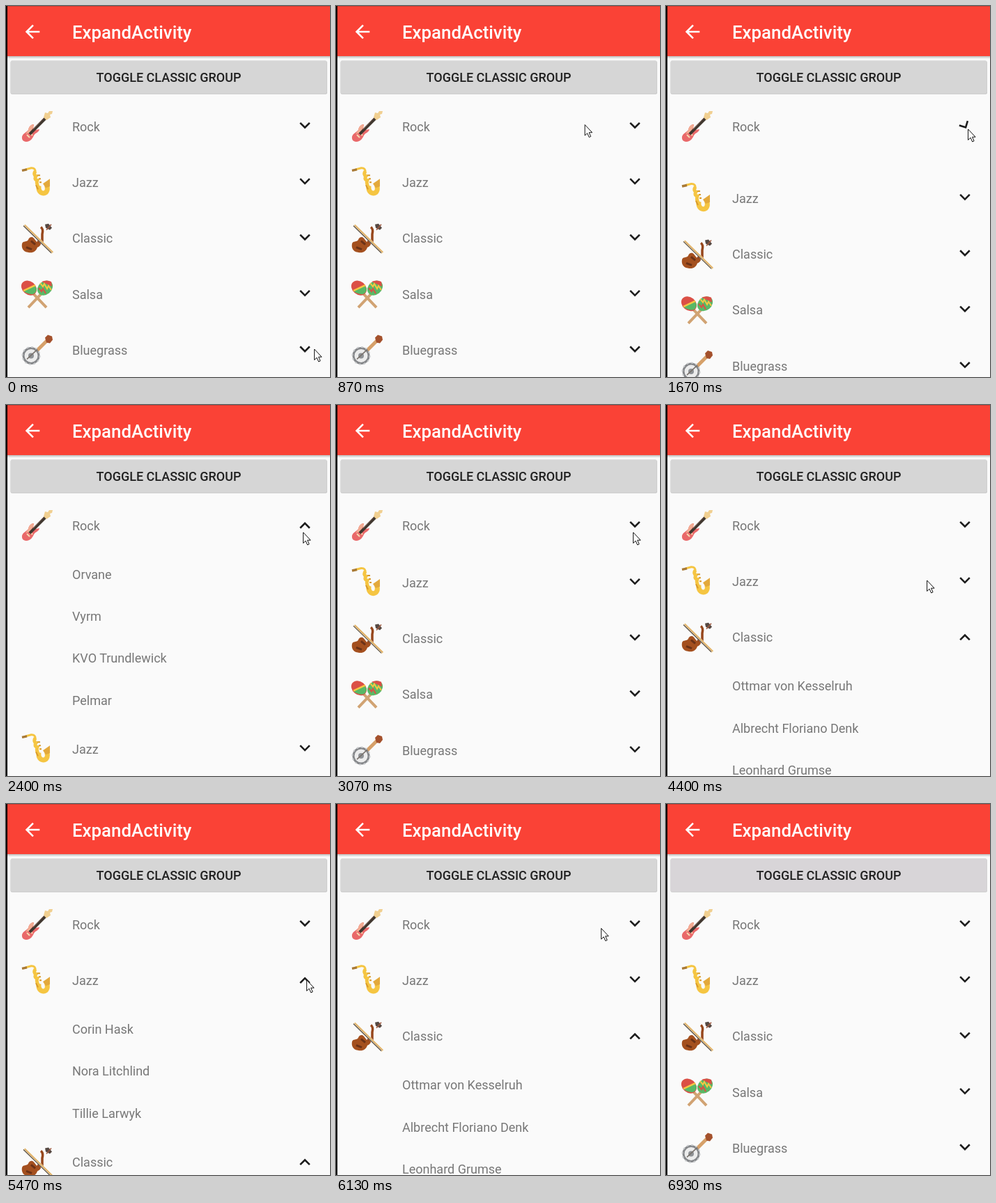
Animation, 465 px wide and 533 px high, one loop 6990 ms. Source, as an HTML page:

```html
<!DOCTYPE html>
<html lang="en">
<head>
<meta charset="utf-8">
<title>ExpandActivity</title>
<style>
html, body { margin: 0; width: 100%; height: 100%; overflow: hidden; background: #fafafa; }
svg { display: block; font: 18px Roboto, sans-serif; }
.row text { fill: #777; }
</style>
</head>
<body>
<svg id="stage" width="465" height="533" viewBox="0 0 465 533">
  <defs>
    <linearGradient id="fall" x2="0" y2="1">
      <stop stop-color="#000" stop-opacity=".25"/>
      <stop offset="1" stop-color="#000" stop-opacity="0"/>
    </linearGradient>
    <filter id="blur" x="-5%" y="-30%" width="110%" height="160%"><feGaussianBlur stdDeviation="2.5"/></filter>

    <g id="Rock" fill="none">
      <path d="M1 40C0 34 7 32 10 28C11 23 14 20 18 20L17 25L21 28L26 27C25 32 20 32 18 36C16 40 14 44 8 45C4 45 1 43 1 40Z" fill="#e9696a"/>
      <path d="M10 28C11 23 14 20 18 20L17 25L13 32L6 34Z" fill="#f3ab92"/>
      <path d="M8 35L12 39M11 31L16 36" stroke="#f7d9b0" stroke-width="2"/>
      <path d="M12 34L35 11" stroke="#40372f" stroke-width="4"/>
      <path d="M17 27L33 10" stroke="#8d7468" stroke-width="1"/>
      <path d="M32 10L34 3L38 4L40 1L45 1L44 5L41 6L42 10L36 14Z" fill="#f0cf90"/>
    </g>
    <g id="Jazz" fill="none" stroke="#f5c542">
      <path d="M6 4.5L14 2.5Q21 2 20 9" stroke-width="3"/>
      <path d="M20 7Q17 12 21 14Q18 19 23 20Q21 25 25 31" stroke-width="5"/>
      <path d="M25 28C23 42 40 42 37 29L37 24" stroke-width="7"/>
      <path d="M31 25L41 18L41 29L35 31Z" fill="#e3a93c" stroke="none"/>
      <path d="M1 6L8 4.5" stroke="#a87935" stroke-width="3.5"/>
      <path d="M23 13L27 13M25 18L28 18M26 23L29 23M21 27L24 33" stroke="#d99a2d" stroke-width="2"/>
    </g>
    <g id="Classic" fill="none">
      <path d="M1 31C2 26 8 29 10 25C11 21 16 20 18 23C21 26 21 29 25 28C31 29 27 35 23 36C21 42 16 45 9 43C2 42 0 36 1 31Z" fill="#a4501f"/>
      <path d="M7 36L15 39M14 27L20 32" stroke="#6b3217" stroke-width="3"/>
      <path d="M28 7Q32 10 30 17L30 28L23 28" stroke="#97471c" stroke-width="3.5"/>
      <path d="M4 4L45 44" stroke="#f3dfb8" stroke-width="4"/>
      <path d="M5 4L45 43" stroke="#dfab5c" stroke-width="1.5"/>
      <path d="M3 5L43 44" stroke="#59514b" stroke-width="1.2"/>
      <path d="M34 3L39 2L44 8L41 11L35 8Z" fill="#564943"/>
      <path d="M36 11L43 3" stroke="#9d5a40" stroke-width="1.5"/>
    </g>
    <g id="Salsa" fill="none">
      <path d="M17 22L36 42M29 22L10 42" stroke="#d1a373" stroke-width="4"/>
      <ellipse cx="11" cy="14" rx="12" ry="9.5" transform="rotate(40 11 14)" fill="#db5046"/>
      <path d="M3 18L19 10L22 15Q21 24 14 23Q6 22 3 18Z" fill="#59b866"/>
      <path d="M3 18L20 10" stroke="#f5c643" stroke-width="2.5"/>
      <ellipse cx="34" cy="14" rx="12" ry="9.5" transform="rotate(-40 34 14)" fill="#59b866"/>
      <path d="M29 5Q36 2 43 5L44 12Z" fill="#db5046"/>
      <path d="M27 7L31 12L33 8L37 15L39 11L43 17" stroke="#f5c643" stroke-width="2"/>
      <path d="M25 14L29 19L31 15L35 22" stroke="#db5046" stroke-width="2"/>
    </g>
    <g id="Bluegrass" fill="none">
      <path d="M18 28L37 9" stroke="#d6a069" stroke-width="5"/>
      <path d="M34 5L38 1L44 3L45 8L41 13L36 12Z" fill="#a4512c"/>
      <circle cx="14" cy="31" r="11" fill="#ececec" stroke="#85878a" stroke-width="3"/>
      <circle cx="14" cy="31" r="12.5" stroke="#c9cbcd" stroke-width="2" stroke-dasharray="3 3.5"/>
      <circle cx="14" cy="31" r="4" fill="#8f9296"/>
      <path d="M8 36L23 22" stroke="#77706a" stroke-width="1.5"/>
    </g>
  </defs>

  <rect width="465" height="533" fill="#fafafa"/>
  <g id="list"></g>
  <rect id="lift" x="5" y="78" width="457" height="50" fill="#000" filter="url(#blur)"/>
  <rect x="6.5" y="79" width="454.5" height="47.8" rx="2.5" fill="#c6c6c6"/>
  <rect x="6.5" y="78.3" width="454" height="47.4" rx="2.5" fill="#d6d6d6"/>
  <rect id="tint" x="6.5" y="78.3" width="454" height="47.4" rx="2.5" fill="#d8d5d8"/>
  <text x="233.5" y="109" text-anchor="middle" font-weight="500" fill="#212121">TOGGLE CLASSIC GROUP</text>

  <rect y="72" width="465" height="4" fill="url(#fall)"/>
  <rect width="465" height="72" fill="#fa4236"/>
  <rect width="465" height="1" fill="#cf3a30"/>
  <path transform="translate(22.6 21.6) scale(1.286)" fill="#fff" d="M20 11H7.83l5.59-5.59L12 4l-8 8 8 8 1.41-1.41L7.83 13H20z"/>
  <text x="95" y="47" font-size="25.8" font-weight="500" fill="#fff">ExpandActivity</text>
  <rect width="2" height="533" fill="#000"/>
  <path id="cursor" d="M-.4 0V15.5L3.1 12.2L5.7 18L8.1 16.9L5.6 11.2H10.1Z" fill="#fff" stroke="#111" stroke-width="1"/>
</svg>
<script>
const LOOP = 6990, STEP = 1000 / 15, HEAD = 80.35, CHILD = 60.25, TOP = 173;

// open / close: start of the list movement; size: number of children
const groups = [
  { name: 'Rock', size: 4, open: 1617, close: 2710, kids: ['Orvane', 'Vyrm', 'KVO Trundlewick', 'Pelmar'] },
  { name: 'Jazz', size: 3, open: 5060, close: 5650, kids: ['Corin Hask', 'Nora Litchlind', 'Tillie Larwyk'] },
  { name: 'Classic', size: 4, open: 3880, close: 6400,
    kids: ['Ottmar von Kesselruh', 'Albrecht Floriano Denk', 'Leonhard Grumse'] },
  { name: 'Salsa' },
  { name: 'Bluegrass' }
];

// time, x, y of the pointer
const path = [
  [20, 443, 493], [733, 315, 138], [1000, 400, 203], [1267, 434, 177], [1667, 434, 177],
  [2330, 429, 187], [2400, 427, 183], [3267, 427, 183], [3533, 305, 103], [4130, 305, 103],
  [4400, 375, 252], [4650, 438, 258], [4800, 432, 253], [6000, 432, 253], [6267, 330, 104],
  [6600, 330, 104], [6930, 470, 300]
];

const $ = id => document.getElementById(id);
const ramp = (t, start, span) => Math.min(1, Math.max(0, (t - start) / span));
const ease = (t, start, span) => (1 - Math.cos(Math.PI * ramp(t, start, span))) / 2;

$('list').innerHTML = groups.map(g => `<g class="row">
  <use href="#${g.name}" x="22" y="-23"/>
  <text x="95" y="6.5">${g.name}</text>
  <g transform="translate(429 -.7) scale(1.286)"><path fill="#1c1c1c"
    d="M-4.59-4.16L0 .42l4.59-4.58L6-2.75l-6 6-6-6z"/></g>
  <g>${(g.kids || []).map((kid, i) =>
    `<text x="95" y="${(HEAD + CHILD) / 2 + CHILD * i + 6.5}">${kid}</text>`).join('')}</g>
</g>`).join('');

groups.forEach((g, i) => {
  g.row = $('list').children[i];
  g.arrow = g.row.querySelector('path');
  g.box = g.row.lastElementChild;
});

function pointer(t) {
  const i = path.findIndex(p => p[0] > t);
  if (i < 1) return (i ? path[path.length - 1] : path[0]).slice(1);
  const [a, b] = [path[i - 1], path[i]], k = ease(t, a[0], b[0] - a[0]);
  return [a[1] + (b[1] - a[1]) * k, a[2] + (b[2] - a[2]) * k];
}

function draw(t) {
  let y = TOP;
  for (const g of groups) {
    g.row.setAttribute('transform', `translate(0 ${y})`);
    y += HEAD;
    if (!g.size) continue;
    const turn = ease(t, g.open - 28, 300) - ease(t, g.close, 300);
    g.arrow.setAttribute('transform', `rotate(${-180 * turn})`);
    g.box.setAttribute('opacity', ramp(t, g.open + 250, 120) - ramp(t, g.close, 120));
    y += g.size * CHILD * (ease(t, g.open, 250) - ease(t, g.close + 120, 250));
  }
  const first = ramp(t, 3670, 100) - ramp(t, 3870, 230);
  const second = ramp(t, 6280, 100);
  $('tint').setAttribute('opacity', first + second);
  $('lift').setAttribute('opacity', .3 * (first + second - ramp(t, 6420, 230)));
  $('cursor').setAttribute('transform', `translate(${pointer(t)})`);
}

// The screen refreshes 15 times a second
function tick() {
  const t = performance.now() % LOOP;
  draw(Math.floor((t + 4) / STEP) * STEP);
  requestAnimationFrame(tick);
}
tick();
</script>
</body>
</html>
```
